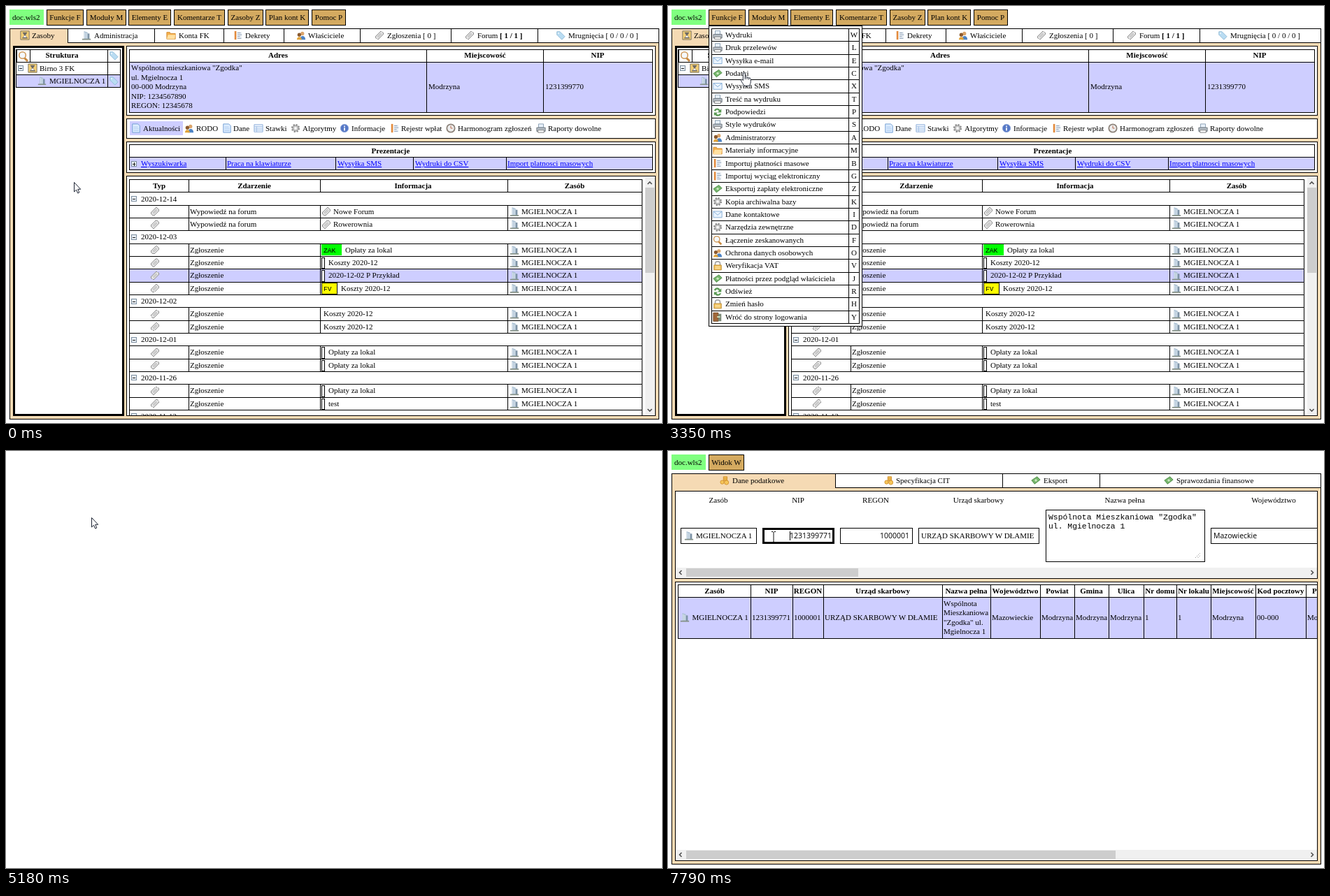
These frames come from a looping animation (938 by 597 pixels, 8000 ms). An HTML page:

```html
<!DOCTYPE html>
<html lang="pl">
<head>
<meta charset="utf-8">
<title>Panel administracyjny</title>
<style>
html, body { margin: 0; width: 100%; height: 100%; overflow: hidden; background: #fff; }
svg { display: block; }
rect { shape-rendering: crispEdges; }
text { font: 11px "Liberation Serif", "Times New Roman", serif; fill: #000; }
.b { font-weight: bold; }
.m { text-anchor: middle; }
.e { text-anchor: end; }
.a { fill: #00f; text-decoration: underline; }
.u { font: 10.5px "Open Sans", sans-serif; }
.c { font: 11.4px "Liberation Mono", monospace; }
.k { font: 9.6px "Liberation Mono", monospace; }
</style>
</head>
<body>
<svg id="stage" width="938" height="597" viewBox="0 0 938 597"></svg>
<script>
const WHEAT = '#f5dab4', TAN = '#d4aa60', LILAC = '#ceceff', GREEN = '#80ff80', TRACK = '#f0f0f0', THUMB = '#cdcdcd';
const STREET = 'Mgielnocza 1', FLAT = STREET.toUpperCase(), TOWN = 'Modrzyna';
const OFFICE = 'URZĄD SKARBOWY W DŁAMIE';

// Building blocks: edges are pixel columns and rows, text is placed by its vertical centre
const fill = (x0, y0, x1, y1, f) => `<rect x="${x0}" y="${y0}" width="${x1 - x0}" height="${y1 - y0}" fill="${f}"/>`;
const box = (x0, y0, x1, y1, f = '#fff', w = 1) => fill(x0, y0, x1 + 1, y1 + 1, '#000') + fill(x0 + w, y0 + w, x1 + 1 - w, y1 + 1 - w, f);
const hline = (x0, x1, y) => fill(x0, y, x1 + 1, y + 1, '#000');
const vline = (x, y0, y1) => fill(x, y0, x + 1, y1 + 1, '#000');
const text = (x, y, s, cls = '') => `<text x="${x}" y="${Math.round(y + 3.5)}" class="${cls}">${s}</text>`;
const icon = (name, x, y, size = 14) => `<use href="#${name}" x="${x}" y="${y - size / 2}" width="${size}" height="${size}"/>`;
const group = (id, s) => `<g id="${id}">${s}</g>`;
const clip = (id, x, y, w, h, s) => `<clipPath id="${id}"><rect x="${x}" y="${y}" width="${w}" height="${h}"/></clipPath><g clip-path="url(#${id})">${s}</g>`;
const chevron = d => `<path d="${d}" fill="none" stroke="#505050" stroke-width="1.6"/>`;
const toggle = (x, y, plus) => `<rect x="${x + .5}" y="${y - 3.5}" width="7" height="7" fill="#e8eef4" stroke="#7d8fa0"/>` +
  fill(x + 2, y, x + 6, y + 1, '#222') + (plus ? fill(x + 3.5, y - 2, x + 4.5, y + 3, '#222') : '');

const ICONS = {
  home: '<path d="M1 1h14v14H1z" fill="#f4cf74" stroke="#6f6b60"/><path d="M4 3h8L9 8l4 5H3l4-5z" fill="#6d6a66"/><path d="M5 11l3-3 3 3z" fill="#fff"/>',
  flat: '<path d="M4 1l6 2v11H4z" fill="#a9bfd2"/><path d="M10 5h3v9h-3z" fill="#7e93a6"/><path d="M5.5 3v10M8 4v9" stroke="#eef4fa"/><path d="M1 14.5h14" stroke="#87938a" stroke-width="2"/>',
  folder: '<path d="M1 3h5l1 2h8v9H1z" fill="#f5b04c" stroke="#d1862a"/><path d="M3 7h12l-1 7H1z" fill="#ffe0a0"/>',
  ledger: '<path d="M2 1h3v14H2z" fill="#e28a3c"/><path d="M6 2h8v12H6z" fill="#edf1f5"/><path d="M7 4h5M7 7h7M7 10h4M7 13h6" stroke="#8399b2"/>',
  people: '<circle cx="10" cy="5" r="3" fill="#dba46a"/><path d="M6 15c0-8 9-8 9 0z" fill="#4d83c4"/><circle cx="5" cy="7" r="3" fill="#8a5a30"/><path d="M1 15c0-6 8-6 8 0z" fill="#e1a43b"/>',
  clip: '<g transform="rotate(45 8 8)" fill="#e2e2e2" stroke="#888"><rect x="4.5" y="1" width="7" height="14" rx="2"/><path d="M7 4v8M9 4v8" stroke="#aaa"/></g>',
  tag: '<path d="M2 2l5 0 8 8-5 5-8-8z" fill="#b9dcf2" stroke="#8db7d4"/><circle cx="4.5" cy="4.5" r="1" fill="#fff"/>',
  doc: '<path d="M2 1h9l3 3v11H2z" fill="#dcecff" stroke="#6a98d0"/><path d="M4 6h7M4 9h8M4 12h8" stroke="#a8c6ea"/>',
  sheet: '<path d="M1 2h14v12H1z" fill="#f0f6ff" stroke="#86a9d6"/><path d="M1 5h14M5 5v9M1 8h14M1 11h14" stroke="#9dbce2"/>',
  gear: '<circle cx="8" cy="8" r="5.5" fill="#d2d2d2" stroke="#8b8b8b" stroke-width="3" stroke-dasharray="2.4 1.9"/><circle cx="8" cy="8" r="4.5" fill="#ccc" stroke="#999"/><circle cx="8" cy="8" r="2" fill="#fff"/>',
  info: '<circle cx="8" cy="8" r="6.5" fill="#5678c6" stroke="#8fa7da"/><path d="M8 4v2M8 7v5" stroke="#fff" stroke-width="2"/>',
  clock: '<circle cx="8" cy="8" r="6.5" fill="#eee" stroke="#8b8178" stroke-width="2"/><path d="M8 4v4h3" fill="none" stroke="#b05a3a"/>',
  printer: '<path d="M4 1h8v6H4z" fill="#e8f1fa" stroke="#8298ad"/><path d="M1 7h14v6H1z" fill="#b8c0c8" stroke="#646c74"/><path d="M3 11h10v4H3z" fill="#f7f7f7" stroke="#777"/>',
  mail: '<path d="M1 3h14v10H1z" fill="#eaf4ff" stroke="#7da7d0"/><path d="M1 3l7 6 7-6" fill="none" stroke="#7da7d0"/>',
  money: '<path d="M1 8l9-6 5 5-9 7z" fill="#75b56b" stroke="#4b8845"/><circle cx="8" cy="8" r="2" fill="#c9e7bd"/>',
  swap: '<path d="M2 6c2-5 8-5 10-1l2-2v6H8l2-2C9 4 5 4 5 7zM14 11c-2 5-8 5-10 2l-2 1V9h6l-2 2c2 2 4 2 5 0z" fill="#5b9a55"/>',
  lock: '<path d="M4 8V5c0-5 8-5 8 0v3" fill="none" stroke="#a6a6a6" stroke-width="2"/><path d="M2 7h12v8H2z" fill="#f1c15c" stroke="#b98a34"/><path d="M4 10h8M4 12.500h8" stroke="#fff0c6"/>',
  door: '<path d="M1 1h8v14H1z" fill="#a0683a" stroke="#6e441f"/><path d="M9 3h5v12H9z" fill="#7b8a78"/><path d="M7 8h5" stroke="#d7efc8" stroke-width="2"/>',
  search: '<path d="M9 10l5 5" stroke="#c88a40" stroke-width="3"/><circle cx="6.500" cy="6.500" r="4.800" fill="#f4f8ff" stroke="#d09a5a" stroke-width="1.600"/>',
  coins: '<g fill="#f6c65a" stroke="#cf8d2c"><path d="M6 2h6v7H6z"/><circle cx="4" cy="11" r="3"/><circle cx="11" cy="11.500" r="3.500"/><path d="M6 4.500h6M6 7h6"/></g>',
  check: '<circle cx="8" cy="8" r="6.500" fill="#9ed29a" stroke="#4f9250"/><path d="M4 8l3 3 5-6" fill="none" stroke="#337a38" stroke-width="2"/>'
};
const defs = '<defs>' + Object.entries(ICONS).map(([id, s]) => `<symbol id="${id}" viewBox="0 0 16 16">${s}</symbol>`).join('') + '</defs>';

const button = (x0, x1, s) => box(x0, 5, x1, 27, TAN) + text((x0 + x1 + 1) / 2, 16.5, s, 'm');
const fileTag = fill(5, 5, 54, 27, GREEN) + text(9, 16.5, 'doc.wls2');

function frame(edges, tabs) {
  let s = fill(0, 0, 938, 597, '#fff') + fileTag + box(5, 32, 933, 591, WHEAT);
  tabs.forEach(([name, x, tx, label], i) => {
    if (i) s += box(edges[i], 32, edges[i + 1], 52);
    s += icon(name, x, 42) + text(tx, 42.5, label);
  });
  return s + vline(edges[1], 32, 52);
}

function sideTree() {
  return box(10, 57, 168, 586, '#fff', 3) + box(14, 62, 163, 116) + fill(15, 99, 163, 116, LILAC) +
    hline(14, 163, 80) + hline(14, 163, 98) + vline(145, 62, 116) + box(15, 62, 34, 80) +
    icon('search', 17, 72, 16) + text(80, 70.5, 'Struktura', 'b m') + icon('tag', 147, 71) +
    toggle(17, 89) + icon('home', 31, 89) + text(48, 89.5, 'Birno 3 FK') +
    icon('flat', 45, 107, 13) + text(62, 107.5, FLAT) + icon('tag', 147, 107);
}

function addressPanel() {
  const lines = ['Wspólnota mieszkaniowa "Zgodka"', 'ul. ' + STREET, '00-000 ' + TOWN, 'NIP: 1234567890', 'REGON: 12345678'];
  return box(172, 57, 928, 156) + box(176, 62, 924, 152, LILAC) + fill(177, 63, 924, 80, '#fff') + hline(176, 924, 80) +
    vline(601, 62, 152) + vline(768, 62, 152) +
    text(389, 70.5, 'Adres', 'b m') + text(685, 70.5, 'Miejscowość', 'b m') + text(846, 70.5, 'NIP', 'b m') +
    lines.map((s, i) => text(179, 88.5 + i * 13.6, s)).join('') + text(604, 115.5, TOWN) + text(771, 115.5, '1231399770');
}

function toolbar() {
  const items = [['doc', 179, 196, 'Aktualności'], ['people', 255, 272, 'RODO'], ['doc', 309, 325, 'Dane'], ['sheet', 354, 371, 'Stawki'],
    ['gear', 407, 424, 'Algorytmy'], ['info', 477, 494, 'Informacje'], ['ledger', 549, 565, 'Rejestr wpłat'],
    ['clock', 629, 646, 'Harmonogram zgłoszeń'], ['printer', 758, 775, 'Raporty dowolne']];
  return box(172, 161, 928, 189) + fill(177, 165, 253, 185, LILAC) +
    items.map(([n, x, tx, s]) => icon(n, x, 175) + text(tx, 175.5, s)).join('');
}

function links() {
  const items = [[193, 'Wyszukiwarka'], [316, 'Praca na klawiaturze'], [474, 'Wysyłka SMS'], [585, 'Wydruki do CSV'], [717, 'Import platnosci masowych']];
  return box(172, 194, 928, 238) + box(176, 198, 924, 234, LILAC) + fill(177, 199, 924, 216, '#fff') + hline(176, 924, 216) +
    text(550, 207.5, 'Prezentacje', 'b m') + toggle(179, 226, true) +
    [314, 471, 582, 715].map(x => vline(x, 216, 234)).join('') + items.map(([x, s]) => text(x, 225.5, s, 'a')).join('');
}

function events() {
  const forum = 'Wypowiedź na forum', note = 'Zgłoszenie', cost = 'Koszty 2020-12', pay = 'Opłaty za lokal';
  const rows = ['2020-12-14', [forum, 'clip', 'Nowe Forum'], [forum, 'clip', 'Rowerownia'],
    '2020-12-03', [note, 'ZAK', pay], [note, 'bar', cost], [note, 'bar', '2020-12-02 P Przykład'], [note, 'FV', cost],
    '2020-12-02', [note, '', cost], [note, '', cost], '2020-12-01', [note, 'bar', pay], [note, 'bar', pay],
    '2020-11-26', [note, 'bar', pay], [note, 'bar', 'test'], '2020-11-12'];
  const indent = { clip: 468, ZAK: 485, bar: 461, FV: 479, '': 454 };
  const columns = (y0, y1) => [261, 449, 717].map(x => vline(x, y0, y1)).join('');
  let s = box(176, 248, 909, 620) + columns(248, 266);
  [[219, 'Typ'], [355, 'Zdarzenie'], [582, 'Informacja'], [813, 'Zasób']].forEach(([x, h]) => s += text(x, 257, h, 'b m'));
  rows.forEach((row, i) => {
    const y = 276 + i * 18.32, top = Math.round(y - 9.6), end = Math.round(y + 8.72);
    if (i === 6) s += fill(177, top, 909, end, LILAC);
    s += hline(176, 909, top);
    if (typeof row === 'string') { s += toggle(179, Math.round(y)) + text(193, y, row); return; }
    const [kind, mark, info] = row;
    s += columns(top, end) + icon('clip', 206, y) + text(263, y, kind) + text(indent[mark], y, info) + icon('flat', 720, y) + text(737, y, FLAT);
    if (mark === 'clip') s += icon('clip', 451, y);
    if (mark === 'bar') s += box(451, top + 2, 455, end - 1);
    if (mark === 'ZAK') s += fill(451, top + 1, 480, end - 1, '#0f0') + text(454, y, mark, 'k');
    if (mark === 'FV') s += box(451, top + 1, 473, end - 1, '#ff0') + text(454, y, mark, 'k');
  });
  return box(172, 243, 928, 586) + clip('eventArea', 173, 244, 755, 342, s) +
    fill(914, 245, 928, 586, TRACK) + fill(914, 260, 927, 382, THUMB) + chevron('M917.500 255l3-3 3 3') + chevron('M917.500 577l3 3 3-3');
}

function menu() {
  const items = [['printer', 'Wydruki', 'W'], ['printer', 'Druk przelewów', 'L'], ['mail', 'Wysyłka e-mail', 'E'], ['money', 'Podatki', 'C'],
    ['mail', 'Wysyłka SMS', 'X'], ['printer', 'Treść na wydruku', 'T'], ['swap', 'Podpowiedzi', 'P'], ['printer', 'Style wydruków', 'S'],
    ['people', 'Administratorzy', 'A'], ['folder', 'Materiały informacyjne', 'M'], ['ledger', 'Importuj płatności masowe', 'B'],
    ['ledger', 'Importuj wyciąg elektroniczny', 'G'], ['money', 'Eksportuj zapłaty elektroniczne', 'Z'], ['gear', 'Kopia archiwalna bazy', 'K'],
    ['mail', 'Dane kontaktowe', 'I'], ['gear', 'Narzędzia zewnętrzne', 'D'], ['search', 'Łączenie zeskanowanych', 'F'],
    ['people', 'Ochrona danych osobowych', 'O'], ['lock', 'Weryfikacja VAT', 'V'], ['money', 'Płatności przez podgląd właściciela', 'J'],
    ['swap', 'Odśwież', 'R'], ['lock', 'Zmień hasło', 'H'], ['door', 'Wróć do strony logowania', 'Y']];
  return box(58, 28, 277, 458) + box(62, 32, 273, 454) + vline(258, 32, 454) + items.map(([n, s, key], i) => {
    const y = 41.5 + i * 18.35;
    return (i ? hline(62, 273, Math.round(y - 9.5)) : '') + icon(n, 64, y) + text(82, y, s) + text(266, y, key, 'm');
  }).join('');
}

function mainPage() {
  const buttons = [[58, 110, 'Funkcje F'], [115, 171, 'Moduły M'], [175, 235, 'Elementy E'], [240, 312, 'Komentarze T'],
    [317, 367, 'Zasoby Z'], [371, 432, 'Plan kont K'], [437, 485, 'Pomoc P']];
  return frame([5, 88, 212, 311, 397, 506, 636, 760, 933], [['home', 20, 37, 'Zasoby'], ['flat', 108, 126, 'Administracja'],
    ['folder', 229, 247, 'Konta FK'], ['ledger', 325, 342, 'Dekrety'], ['people', 415, 432, 'Właściciele'], ['clip', 527, 545, 'Zgłoszenia [ 0 ]'],
    ['clip', 656, 674, 'Forum <tspan class="b">[ 1 / 1 ]</tspan>'], ['tag', 786, 804, 'Mrugnięcia [ 0 / 0 / 0 ]']]) +
    buttons.map(b => button(...b)).join('') + sideTree() + addressPanel() + toolbar() + links() + events();
}

const hscroll = (y, end) => fill(11, y, 928, y + 14, TRACK) + fill(26, y + 1, end, y + 13, THUMB) +
  chevron(`M19.500 ${y + 4}l-3 3 3 3`) + chevron(`M919.500 ${y + 4}l3 3-3 3`);

function taxForm() {
  const labels = [[72, 'Zasób'], [186, 'NIP'], [297, 'REGON'], [444, 'Urząd skarbowy'], [653, 'Nazwa pełna'], [866, 'Województwo']];
  const fields = [[18, 126], [135, 237], [246, 349], [358, 530], [776, 960]];
  return box(10, 57, 928, 182) + labels.map(([x, s]) => text(x, 70.5, s, 'm')).join('') +
    clip('formArea', 11, 58, 917, 124, fields.map(([a, b]) => box(a, 110, b, 132)).join('') + box(540, 84, 767, 158)) +
    group('focusFlat', box(18, 110, 126, 132, '#fff', 3)) + group('focusNip', box(135, 110, 237, 132, '#fff', 3) + vline(174, 115, 127)) +
    icon('flat', 23, 121) + text(40, 121.5, FLAT) + text(234, 121.5, '1231399771', 'u e') + text(345, 121.5, '1000001', 'u e') +
    text(362, 121.5, OFFICE) + text(780, 121.5, 'Mazowieckie', 'u') +
    text(544, 94.5, 'Wspólnota Mieszkaniowa "Zgodka"', 'c') + text(544, 107, 'ul. ' + STREET, 'c') +
    '<path d="M754 153l7-7M757.500 153l3.500-3.500" stroke="#999" stroke-dasharray="1.500 1.500"/>' + hscroll(167, 272);
}

function taxTable() {
  const edges = [15, 118, 178, 222, 392, 461, 532, 581, 630, 680, 727, 776, 840, 912];
  const heads = ['Zasób', 'NIP', 'REGON', 'Urząd skarbowy', 'Nazwa pełna', 'Województwo', 'Powiat', 'Gmina', 'Ulica', 'Nr domu', 'Nr lokalu', 'Miejscowość', 'Kod pocztowy'];
  const cells = ['', '1231399771', '1000001', OFFICE, '', 'Mazowieckie', TOWN, TOWN, TOWN, '1', '1', TOWN, '00-000', TOWN];
  const name = ['Wspólnota', 'Mieszkaniowa', '"Zgodka" ul.', STREET];
  const s = box(14, 191, 960, 268, LILAC) + fill(15, 192, 960, 209, '#fff') + hline(14, 960, 209) +
    edges.slice(1).map(x => vline(x, 191, 268)).join('') +
    heads.map((h, i) => text((edges[i] + edges[i + 1]) / 2, 200.5, h, 'b m')).join('') + text(921, 200.5, 'Poczta', 'b') +
    cells.map((c, i) => c && text(edges[i] + 2, 238.5, c)).join('') + name.map((n, i) => text(394, 218 + i * 13.6, n)).join('') +
    icon('flat', 17, 238) + text(34.5, 238.5, FLAT);
  return box(10, 187, 928, 586) + clip('tableArea', 11, 188, 917, 398, s) + hscroll(571, 640);
}

function taxPage() {
  return frame([5, 239, 478, 617, 933], [['coins', 74, 92, 'Dane podatkowe'], ['coins', 309, 326, 'Specyfikacja CIT'],
    ['money', 519, 537, 'Eksport'], ['money', 709, 727, 'Sprawozdania finansowe']]) + button(58, 108, 'Widok W') +
    group('extra', fill(113, 6, 169, 27, '#9f9fe0') + text(141, 16.5, 'Wspólnoty', 'm') +
      fill(173, 6, 250, 27, '#9fdf9f') + icon('check', 176, 16) + text(190, 16.5, 'Dane dla US')) +
    taxForm() + taxTable() +
    group('popup', box(19, 134, 131, 180, '#fff', 3) + box(23, 138, 127, 176, LILAC) + fill(24, 139, 127, 157, '#fff') + hline(23, 127, 157) +
      text(75, 148, 'Wspólnota', 'b m') + icon('flat', 25, 166) + text(42.5, 166.5, FLAT));
}

const pointers = '<g id="cursor"><circle id="click" r="10" fill="#f4df38" opacity=".8"/>' +
  '<path id="arrow" d="M.5 .5V14L3.500 11.200 5.700 16 7.800 15 5.700 10.300H9.700Z" fill="#fff" stroke="#1d2433"/>' +
  '<path id="hand" d="M-1.700 2C-1.700 .1 1.300 .1 1.300 2V7.200C1.500 6 4 6.200 4 7.600 4.400 6.600 6.600 6.900 6.600 8.300 7.200 7.600 9.300 8 9.300 9.500V13.500C9.300 16 7.800 17 7.800 19.300H-.3C-.3 17.500-4.500 13.500-4.600 11.200-4.600 9.600-3 9.600-1.700 11.500ZM1.300 7V10M4 7.600V10M6.600 8.300V10.500" fill="#fff" stroke="#1d2433"/>' +
  '<path id="beam" d="M-3-7.500H-1L0-6.500 1-7.500H3M0-6.500V6.500M-3 7.500H-1L0 6.500 1 7.500H3" fill="none" stroke="#111"/></g>';

document.getElementById('stage').innerHTML = defs + group('main', mainPage()) + group('menu', menu()) +
  group('dark', fill(0, 0, 938, 597, '#2a292e')) + group('blank', fill(0, 0, 938, 597, '#fff')) + group('tax', taxPage()) + pointers;

// start, end, steps, from x, y, to x, y, sideways bow
const MOVES = [
  [390, 1190, 11, 97, 252, 99, 22, 9],
  [1270, 1350, 2, 99, 22, 99, 20, 0],
  [2430, 3050, 9, 99, 20, 118, 92.5, 0],
  [3200, 3350, 3, 118, 92.5, 109, 95, 0],
  [3680, 3900, 4, 109, 95, 113.5, 95.5, 0],
  [4300, 4460, 3, 113.5, 95.5, 118.5, 95.5, 0],
  [4770, 4850, 2, 118.5, 95.5, 121, 95, 0],
  [5100, 5100, 1, 121, 95, 122, 95, 0],
  [6130, 6610, 7, 122, 95, 77, 166, 0],
  [7080, 7790, 10, 77, 166, 151, 123, 0]
];
const CLICKS = [[80, 240], [1810, 1970], [5020, 5100], [6770, 6850]];

function place(t) {
  const move = MOVES.filter(m => m[0] <= t).pop();
  if (!move) return [97, 252];
  const [t0, t1, n, x0, y0, x1, y1, bow] = move;
  const step = (t1 - t0) / (n - 1) || 1;
  const k = Math.min(n, Math.floor((t - t0 + 4) / step) + 1) / n;
  const e = k * k * (3 - 2 * k);
  return [x0 + (x1 - x0) * e + bow * 4 * e * (1 - e), y0 + (y1 - y0) * e];
}

const show = (id, on) => document.getElementById(id).style.display = on ? '' : 'none';
const cursor = document.getElementById('cursor');

function draw(t) {
  const [x, y] = place(t);
  const hand = t >= 1190 && t < 5100, beam = t >= 7080 && x > 135 && y < 133;
  cursor.setAttribute('transform', `translate(${Math.round(x)} ${Math.round(y)})`);
  show('hand', hand);
  show('beam', beam);
  show('arrow', !hand && !beam);
  show('click', CLICKS.some(([a, b]) => t >= a && t < b));
  show('main', t < 5100);
  show('menu', t >= 1970 && t < 5100);
  show('dark', t >= 5100 && t < 5180);
  show('blank', t >= 5180 && t < 5260);
  show('tax', t >= 5260);
  show('extra', t >= 5340 && t < 6850);
  show('popup', t >= 5340 && t < 7080);
  show('focusFlat', t >= 5340 && t < 7080);
  show('focusNip', t >= 7080);
}

const start = performance.now();
function tick() {
  draw((performance.now() - start) % 8000);
  requestAnimationFrame(tick);
}
tick();
</script>
</body>
</html>
```
